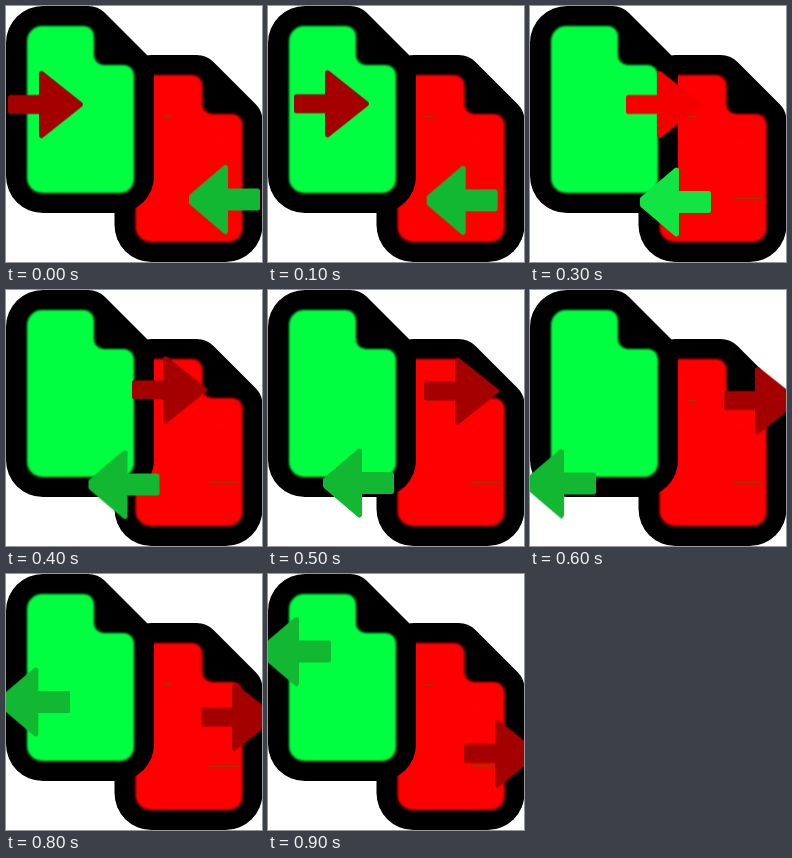
Write an HTML page that moves like this. It is 256 px wide and 256 px high and loops after 1000 ms.

```html
<!DOCTYPE html>
<html lang="en">
<head>
<meta charset="utf-8">
<title>File swap</title>
<style>
  html, body { margin: 0; width: 100%; height: 100%; overflow: hidden; background: #fff; }
  svg { display: block; width: 100vw; height: 100vh; }
  .arrow { stroke: currentColor; stroke-width: 5; stroke-linejoin: round; fill: currentColor; }
  #right { color: #a40000; }
  #left { color: #12b832; }
</style>
</head>
<body>
<svg viewBox="0 0 256 256">
  <defs>
    <filter id="soft" x="-5%" y="-5%" width="110%" height="110%" color-interpolation-filters="sRGB">
      <feGaussianBlur stdDeviation="0.8"/>
    </filter>
    <path id="rim" d="M37 0H82Q92 0 99 7L141 49Q148 56 148 66V170A37 37 0 0 1 111 207H37A37 37 0 0 1 0 170V37A37 37 0 0 1 37 0Z"/>
    <path id="page" d="M36 20H78A10 10 0 0 1 88 30V49A10 10 0 0 0 98 59H118A10 10 0 0 1 128 69V173A14 14 0 0 1 114 187H36A15 15 0 0 1 21 172V35A15 15 0 0 1 36 20Z"/>
  </defs>

  <g transform="translate(108.5 49)">
    <use href="#rim"/>
    <use href="#page" fill="#f00" filter="url(#soft)"/>
  </g>
  <path d="M157 110.5h9M204 192.5h28M209 135.5h5" stroke="#a03800" fill="none"/>
  <use href="#rim"/>
  <use href="#page" fill="#00ff40" filter="url(#soft)"/>

  <g id="right" class="arrow">
    <path d="M-28.5 -7H2.5V-31L41.5 0L2.5 31V7H-28.5Z"/>
  </g>
  <g id="left" class="arrow">
    <path d="M29.5 -8.5H-2.5V-32L-36.5 -3V3L-2.5 32V8.5H29.5Z"/>
  </g>
</svg>
<script>
  // Smooth paths, sampled ten times per loop.
  const timing = { duration: 1000, iterations: Infinity, easing: "steps(10, end)" };

  const at = (offset, x, y, easing = "linear") =>
    ({ offset, transform: `translate(${x}px, ${y}px)`, easing });

  function play(id, path, flash) {
    const el = document.getElementById(id);
    const rest = getComputedStyle(el).color;
    const end = { ...path[path.length - 1], offset: 1 };
    el.animate([...path, end], timing);
    el.animate([
      { offset: 0, color: rest, easing: "step-end" },
      { offset: 0.25, color: flash, easing: "step-end" },
      { offset: 0.35, color: rest },
      { offset: 1, color: rest }
    ], timing);
  }

  // Each arrow slides across, then speeds up along the edge.
  play("right", [
    at(0, 33, 98.5),
    at(0.2, 81, 97),
    at(0.3, 127, 98.5),
    at(0.5, 187, 101),
    at(0.6, 225, 110.5, "cubic-bezier(.5, 0, 1, 1)"),
    at(0.9, 227, 179.5)
  ], "#f40000");

  play("left", [
    at(0, 222, 193.5),
    at(0.3, 149, 196),
    at(0.5, 94, 193),
    at(0.6, 34, 193.5, "cubic-bezier(.3, 0, 1, 1)"),
    at(0.9, 31, 77.5)
  ], "#12e444");
</script>
</body>
</html>
```
